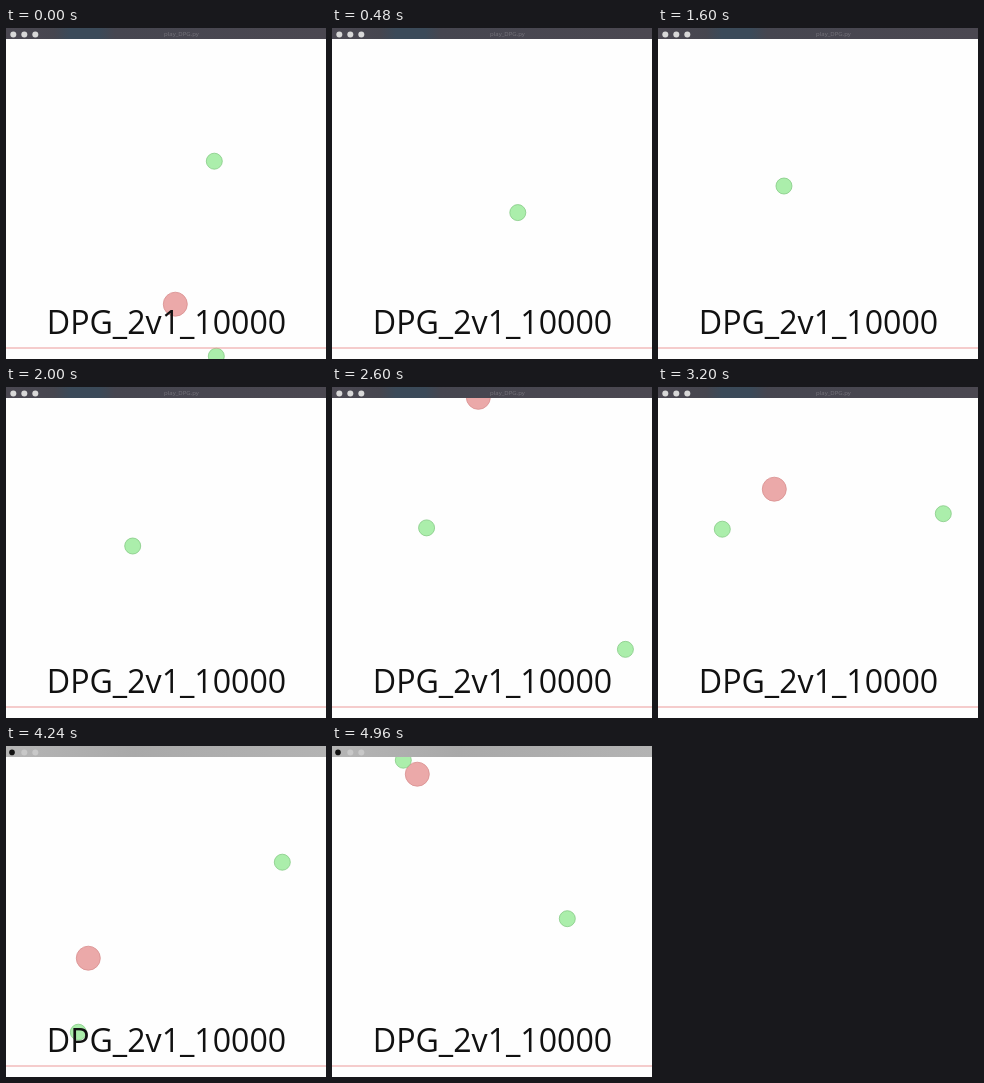
Animation of 320 by 331 pixels, one loop 5000 ms. Source, as an HTML page with a canvas:

```html
<!DOCTYPE html>
<html>
<head>
<meta charset="utf-8">
<style>
html, body { margin: 0; overflow: hidden; background: #fefefe; }
canvas { display: block; }
</style>
</head>
<body>
<canvas id="stage" width="320" height="331"></canvas>
<script>
const ctx = document.getElementById('stage').getContext('2d');
const LOOP = 5000, STEP = 40;
const RED = ['#eba9a9', '#d99090'], GREEN = ['#abeeab', '#86cb86'];

// Each agent glides smoothly through one point per key time.
const times = [0, 480, 1160, 2000, 3200, 4240, 4960];
const agents = [
  { r: 12, colors: RED, x: [169, 215, 232, 180, 116, 82, 85], y: [276, 352, 2, -60, 102, 212, 28] },
  { r: 8, colors: GREEN, x: [208, 185.5, 126, 126.4, 64, 72, 71], y: [133, 184.4, 158.4, 158.8, 142, 286, 14] },
  { r: 8, colors: GREEN, x: [210, 220, 260, 295, 285, 276, 235], y: [328, 350, 400, 400, 126.5, 116, 172.5] }
];

// Cubic Hermite spline with slopes taken from the neighbouring points.
function glide(values, t) {
  const last = times.length - 1;
  const i = Math.max(0, times.findLastIndex((time, n) => time <= t && n < last));
  const slope = n => {
    const a = Math.max(0, n - 1), b = Math.min(last, n + 1);
    return (values[b] - values[a]) / (times[b] - times[a]);
  };
  const span = times[i + 1] - times[i], k = (t - times[i]) / span;
  const ease = k * k * (3 - 2 * k);
  return values[i] + (values[i + 1] - values[i]) * ease
    + span * k * (1 - k) * (slope(i) * (1 - k) - slope(i + 1) * k);
}

function disc(x, y, r, fill, line) {
  ctx.beginPath();
  ctx.arc(x, y, r, 0, 2 * Math.PI);
  ctx.fillStyle = fill;
  ctx.fill();
  if (line) {
    ctx.strokeStyle = line;
    ctx.lineWidth = 0.8;
    ctx.stroke();
  }
}

function label(text, x, y, size, color, align) {
  ctx.font = `${size}px "Open Sans", "Noto Sans", sans-serif`;
  ctx.textAlign = align;
  ctx.fillStyle = color;
  ctx.fillText(text, x, y);
}

function gradient(...stops) {
  const g = ctx.createLinearGradient(0, 0, 320, 0);
  stops.forEach(([at, color]) => g.addColorStop(at, color));
  return g;
}

const darkBar = gradient([0, '#4b4852'], [0.15, '#46464f'], [0.2, '#3b4a59'],
  [0.29, '#3b4a59'], [0.34, '#464650'], [1, '#4b4851']);
const lightBar = gradient([0, '#b5b5b5'], [0.4, '#a9a9a9'], [1, '#b3b3b3']);

function titleBar(menuAlpha) {
  ctx.fillStyle = darkBar;
  ctx.fillRect(0, 0, 320, 11);
  for (const x of [7.3, 18.3, 29.3]) disc(x, 6.4, 3, '#d8d8d8');
  label('play_DPG.py', 175.5, 8, 6, '#77757d', 'center');
  ctx.globalAlpha = menuAlpha;
  ctx.fillStyle = lightBar;
  ctx.fillRect(0, 0, 320, 11);
  disc(6, 6.4, 2.8, '#111');
  for (const x of [18.3, 29.3]) disc(x, 6.4, 3, '#c8c8c8');
  ctx.globalAlpha = 1;
}

function draw(now) {
  const t = Math.floor(now % LOOP / STEP) * STEP;
  ctx.fillStyle = '#fefefe';
  ctx.fillRect(0, 0, 320, 331);
  for (const { r, colors, x, y } of agents) {
    disc(glide(x, t) + 0.3, glide(y, t) + 0.2, r, ...colors);
  }
  ctx.fillStyle = '#ee9c9c';
  ctx.fillRect(0, 319.5, 320, 1);
  label('DPG_2v1_10000', 40.8, 306, 32.1, '#111', 'left');
  titleBar(Math.min(1, Math.max(0, (t - 3700) / 400)));
  requestAnimationFrame(draw);
}
requestAnimationFrame(draw);
</script>
</body>
</html>
```
